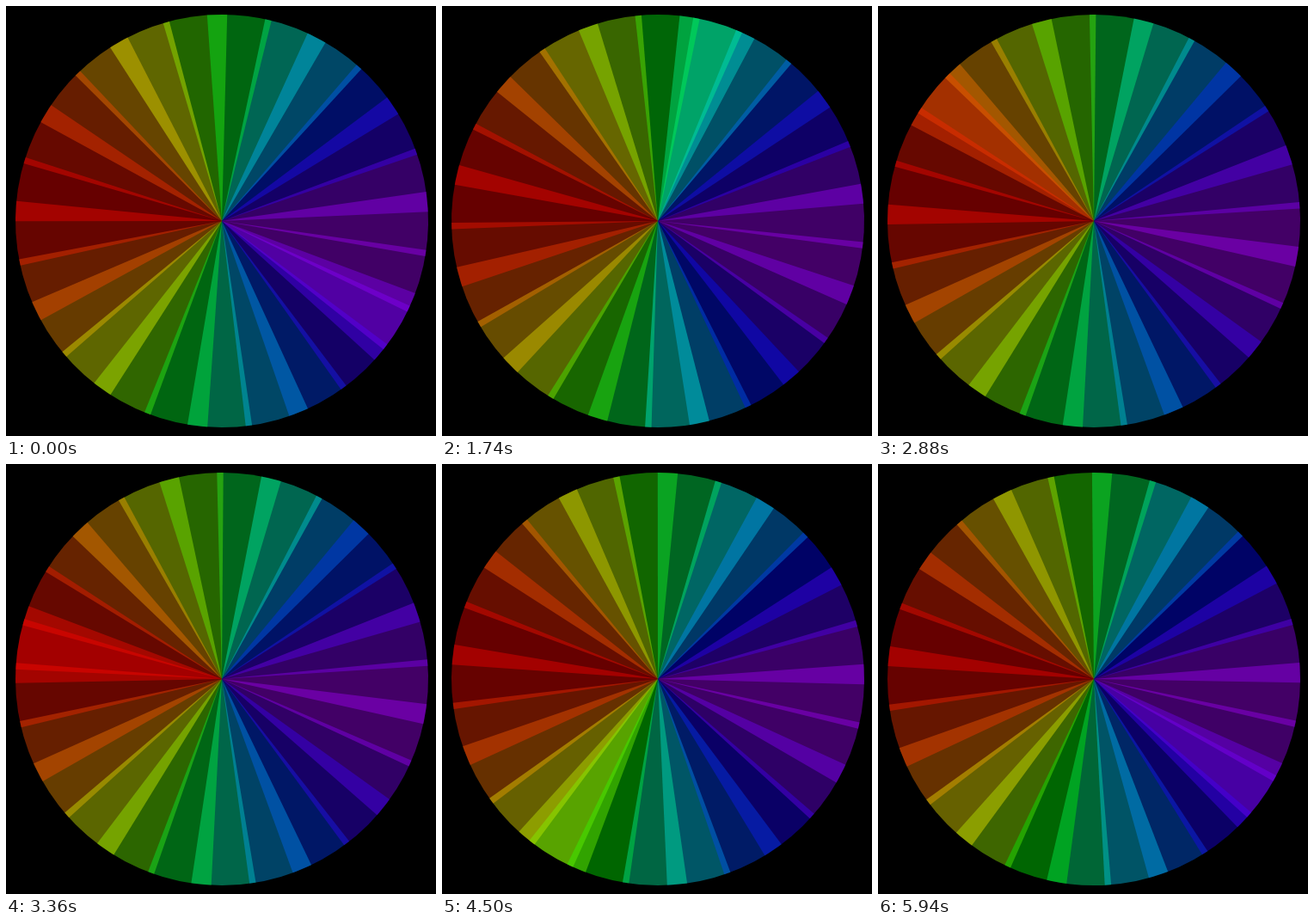
Animation, 500 px wide and 500 px high, one loop 6 s. Source, as an HTML page with a canvas:

```html
<!DOCTYPE html>
<html>
<head>
<meta charset="utf-8">
<style>
  html, body { margin: 0; width: 100%; height: 100%; overflow: hidden; background: #000; }
  canvas { display: block; }
</style>
</head>
<body>
<canvas id="stage" width="500" height="500"></canvas>
<script>
const ctx = document.getElementById('stage').getContext('2d');
const TAU = Math.PI * 2;
const LOOP = 6000, STEP = 60;
const CX = 251, CY = 250, RADIUS = 240;
const PHASE = 0.424, SPACING = 0.5, WIDTH = Math.PI / 10;

// Two turns of translucent sectors; the hue depends on where each one starts.
function draw(turn) {
  ctx.globalAlpha = 1;
  ctx.fillStyle = '#000';
  ctx.fillRect(0, 0, 500, 500);
  ctx.globalAlpha = 0.4;
  for (let offset = 0; offset < 2 * TAU; offset += SPACING) {
    const start = PHASE + offset - turn * TAU;
    ctx.fillStyle = `hsl(${140 + 140 * Math.cos(start)}, 100%, 50%)`;
    ctx.beginPath();
    ctx.moveTo(CX, CY);
    ctx.arc(CX, CY, RADIUS, start, start + WIDTH);
    ctx.fill();
  }
}

function tick() {
  const time = performance.now() % LOOP;
  draw(Math.floor(time / STEP) * STEP / LOOP);
  requestAnimationFrame(tick);
}
tick();
</script>
</body>
</html>
```
